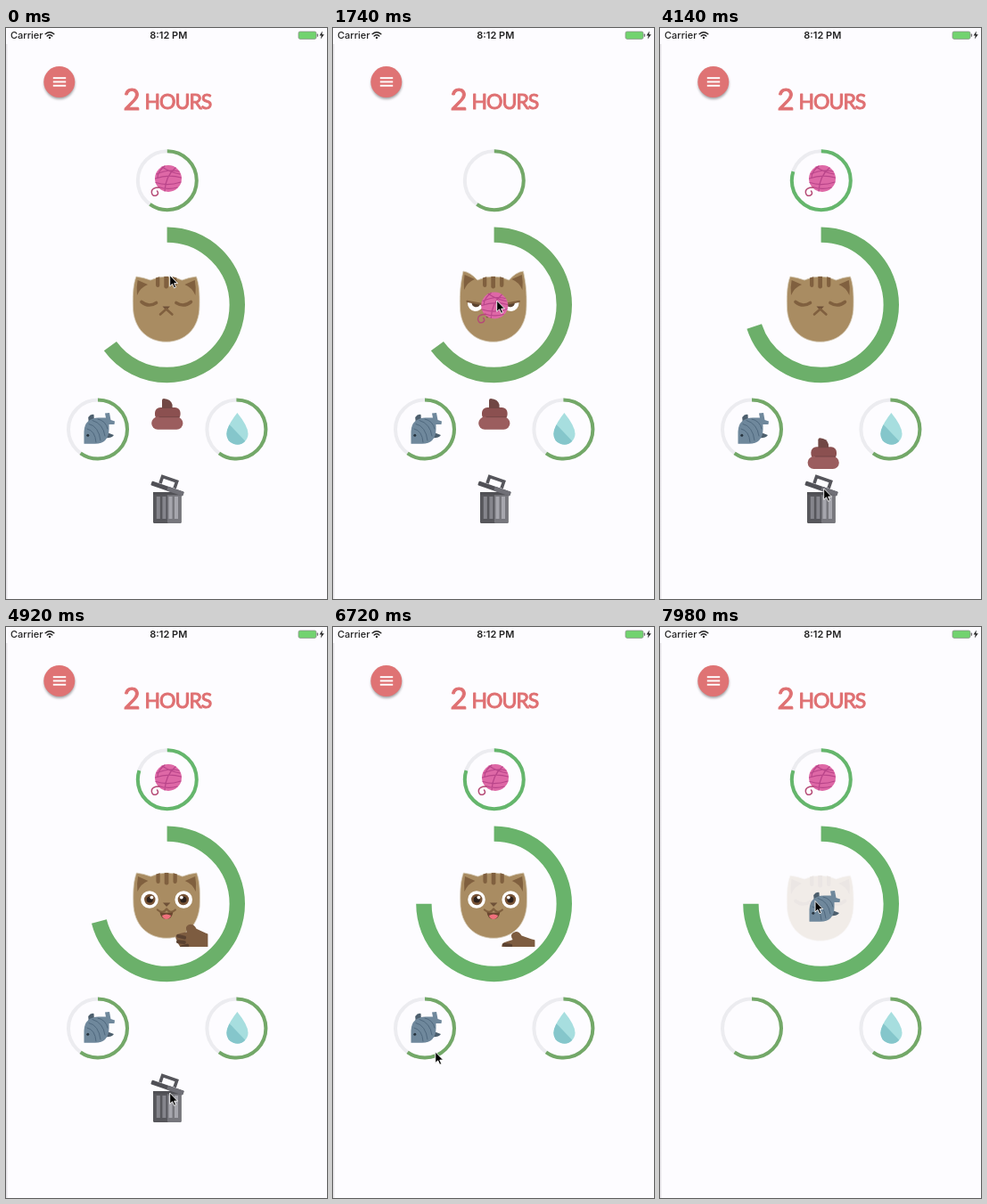
Write an HTML page that moves like this. It is 360 px wide and 641 px high and loops after 8000 ms.

```html
<!DOCTYPE html>
<html lang="en">
<head>
<meta charset="utf-8">
<title>Cat care</title>
<style>
html, body { margin: 0; width: 100%; height: 100%; overflow: hidden; background: #fdfcff; }
svg { display: block; width: 100vw; height: 100vh; }
.bar { font: 500 11px Inter, sans-serif; fill: #222; }
.title { font-family: Lato, sans-serif; fill: #df7072; stroke: #df7072; stroke-width: 1; stroke-linejoin: round; }
.line { fill: none; stroke-linecap: round; stroke-linejoin: round; }
</style>
</head>
<body>
<svg id="stage" viewBox="0 0 360 641" preserveAspectRatio="none"></svg>
<script>
const LOOP = 8000;
const BROWN = '#a98c62', DARK = '#80603f';

const line = (d, color, w) => `<path class="line" d="${d}" stroke="${color}" stroke-width="${w}"/>`;
const shape = (d, color) => `<path d="${d}" fill="${color}"/>`;
const disc = (x, y, r, color) => `<circle cx="${x}" cy="${y}" r="${r}" fill="${color}"/>`;
const box = (x, y, w, h, color, r = 0) =>
  `<rect x="${x}" y="${y}" width="${w}" height="${h}" rx="${r}" fill="${color}"/>`;
const group = (id, body) => `<g id="${id}">${body}</g>`;
const both = part => part + `<g transform="matrix(-1 0 0 1 359.4 0)">${part}</g>`;

function ring(id, x, y, r, w, track) {
  const c = `cx="${x}" cy="${y}" r="${r}" fill="none" stroke-width="${w}"`;
  return (track ? `<circle ${c} stroke="#ececf0"/>` : '') +
    `<circle id="${id}" ${c} pathLength="100" transform="rotate(-90 ${x} ${y})"/>`;
}

function head(ear) {
  const d = `M142.4 312C142 297 143 287 146 ${ear}Q154 ${ear + 1} 162 283Q180 275 197.4 283
    Q205 ${ear + 1} 213.4 ${ear}C216.4 287 217.4 297 217 312C217 338 200 352.3 179.7 352.3S142.4 338 142.4 312Z`;
  return `<path d="${d}" fill="${BROWN}" stroke="#d9cebb" stroke-width=".8"/>` +
    both(shape(`M147.6 ${ear + 4}L159 ${ear + 9}Q151 ${ear + 12} 147 ${ear + 21}Q146 ${ear + 12} 147.6 ${ear + 4}Z`, DARK)) +
    both(shape('M168 280.4L172.3 279.3V289Q172.3 291 170.2 291T168 288Z', DARK)) +
    shape('M177.3 279H182V291Q179.7 294 177.3 291Z', DARK);
}

const nose = shape('M175.5 312.5H184L179.7 317Z', '#6f5138');

const sleepFace = both(line('M152 307.5Q160 314 168.5 308.5', DARK, 3.6)) + nose +
  line('M173 321.5L179.7 315.5L186.4 321.5', DARK, 2.6);

const grumpyFace = both(
  shape('M151 307.5L168.5 310.5A8.8 8.8 0 0 1 151 309Z', '#fff') +
  shape('M155.5 308.3L165 310A4.9 4.9 0 0 1 155.5 308.3Z', '#5b4330') +
  line('M150.5 306.8L169 310.3', DARK, 2.2)) + nose +
  line('M173 324L179.7 317L186.4 324', DARK, 2.6);

const happyFace = both(disc(160.6, 309, 9.8, '#fff') + disc(160.9, 309, 6.2, '#765235') +
  disc(160.9, 309, 3.6, '#2c211c') + disc(163, 306.6, 1.9, '#fff')) + nose +
  shape('M172 322.5Q179.7 325 187 322.5Q186 331 179.5 331T172 322.5Z', '#6a4630') +
  shape('M174.5 327Q179.5 324 184.8 327Q183 331 179.5 331T174.5 327Z', '#f0717c') +
  line('M169.5 320.5Q175.5 325.5 179.7 319.5Q184 325.5 189.5 320.5', DARK, 2.2);

const paw = shape('M194 327Q192 319 200 320L208 321Q207 314 213 314Q218 314 219 321L227 329L246 345V368L226 357L209 346Q194 342 194 327Z', '#7d5c40') +
  line('M197 322L203 326M194.8 328L201 331M197 335L203 335.5', '#5b4231', 4);

const yarn = disc(182, 169, 15, '#de68a6') +
  line('M169 164Q182 158 194 161M167.5 169Q182 164 196.5 168M168 173.5Q181 178 196 173M171 178.5Q182 182 192 179M175 156Q184 162 195 164M178 155Q170 161 170 168M190 157Q179 166 178 183', '#b9458a', 1.2) +
  line('M172 179Q163 179 163.3 184.5Q164 189.5 168.5 188Q172 186 169.5 183', '#b54a76', 1.5);

const fish = shape('M93 446L92.2 437Q95 433 98.5 434L99 442ZM108 452L121 457Q118 461 110 460Z', '#4d5f6e') +
  shape('M87.5 466.7V453Q88 438 104 437.5H112L111 432.5L116 432L117.5 440L122 441.5L121.5 445H115.5V451Q115 466.5 100 466.7Z', '#6f889c') +
  line('M93 444.5Q104 447 106 463M97 440.5Q109 444 111 458M103 439Q112 441 114 450M91 450Q100 452 101 465', '#4f687e', 1) +
  disc(91.8, 457.3, 1.5, '#27343f');

const drop = shape('M259.4 432Q271.5 447 271.5 455.5A12 12 0 0 1 247.4 455.5Q247.4 447 259.4 432Z', '#a7dedf') +
  shape('M250.6 445.2L268.3 463.7A12 12 0 0 1 247.4 455.5Q247.5 451 250.6 445.2Z', '#85c6cb');

const poop = box(167, 426, 28.6, 14, '#8b5050', 6) + box(163.2, 436.6, 35.2, 14.2, '#9b5d5e', 7) +
  shape('M175 427V418Q175 416 177 416Q185 416.5 186.6 423V427Z', '#714744') +
  line('M172 436.7H194', '#734545', 1);

const trash = box(165, 521, 31.6, 35, '#57575c', 1.5) + box(181, 521, 15.6, 35, '#77777d', 1.5) +
  [168.8, 175.4].map(x => box(x, 526, 4, 25, '#85858c')).join('') +
  [182.5, 189].map(x => box(x, 526, 4, 25, '#a6a6ad')).join('') +
  box(165, 521, 31.6, 3.2, '#505055') +
  `<g transform="rotate(19 181 517)">${box(162, 514.5, 38, 5, '#505056', 1)}${box(181, 514.5, 19, 5, '#707077', 1)}
  <path d="M171.5 514V506H188.5V514" fill="none" stroke="#55555b" stroke-width="3.6"/></g>`;

const status = `<text class="bar" x="5" y="12" font-weight="400">Carrier</text>` +
  line('M44.2 6.8Q49 2.6 53.8 6.8M46.2 9Q49 6.6 51.8 9', '#222', 1.5) + disc(49, 10.9, 1.2, '#222') +
  `<text class="bar" x="182.3" y="12" text-anchor="middle" style="font-weight:600">8:12 PM</text>` +
  `<rect x="328" y="4" width="20" height="8.4" rx="1.8" fill="#72d36f" stroke="#8a8a8a" stroke-width=".7"/>` +
  box(348.7, 6.6, 1.4, 3.2, '#777', .6) + shape('M354.8 3.5L351.6 8.6H353.8L352.8 12.6L356.8 7.2H354.4Z', '#222');

const $ = id => document.getElementById(id);
$('stage').innerHTML = `
<defs>
  <linearGradient id="edge"><stop stop-color="#dfdde1"/><stop offset="1" stop-color="#fdfcff"/></linearGradient>
  <filter id="soft" x="-50%" y="-50%" width="200%" height="200%"><feGaussianBlur stdDeviation="1.5"/></filter>
  <clipPath id="frame"><rect x="140" y="260" width="86.4" height="99"/></clipPath>
</defs>
<rect width="360" height="641" fill="#fdfcff"/>
<rect y="18" width="2.5" height="623" fill="url(#edge)"/>
${status}
<circle cx="60" cy="62.5" r="17.2" fill="#000" opacity=".38" filter="url(#soft)"/>
${disc(59.8, 60.5, 17.5, '#df7374')}
${[55.2, 59.5, 63.8].map(y => box(52.8, y, 14.4, 1.9, '#fff')).join('')}
<text class="title" x="131.5" y="91.5" font-size="33">2</text>
<text class="title" x="155.5" y="90.8" font-size="23" letter-spacing="-1">HOURS</text>
${ring('top', 180.8, 171.2, 33, 4, true)}
${ring('left', 103, 450.6, 33, 4, true)}
${ring('right', 258.4, 450.6, 33, 4, true)}
${ring('mood', 180.6, 310.8, 78.7, 17.4)}
${group('sleep', head(279) + sleepFace)}
${group('grumpy', head(273) + grumpyFace)}
${group('happy', `<g transform="translate(.4 -3)">${head(279) + happyFace}</g>
  <g clip-path="url(#frame)">${group('paw', paw)}</g>`)}
${group('trash', trash)}${group('poop', poop)}${group('yarn', yarn)}${group('fish', fish)}${drop}
<g id="cursor"><path d="M0 0V12.4L2.9 9.8L4.9 14.3L6.9 13.4L5 9.1H8.8Z" fill="#000" stroke="#fff" stroke-width=".9"/></g>`;

// Eased value of [time, value] stops.
function key(t, stops) {
  let [t0, v0] = stops[0];
  for (const [t1, v1] of stops) {
    if (t < t1) {
      const p = Math.max(0, (t - t0) / (t1 - t0 || 1));
      return v0 + (v1 - v0) * p * p * (3 - 2 * p);
    }
    [t0, v0] = [t1, v1];
  }
  return v0;
}

const ramp = (t, start, length) => Math.min(1, Math.max(0, (t - start) / length));
const move = (id, x, y, more = '') => $(id).setAttribute('transform', `translate(${x} ${y})${more}`);
const fade = (id, v) => $(id).setAttribute('opacity', v);

function fill(id, value) {
  const p = (value - 60) / 20;
  const mix = (a, b) => Math.round(a + (b - a) * p);
  const el = $(id);
  el.setAttribute('stroke', `rgb(${mix(115, 101)},${mix(168, 182)},${mix(104, 108)})`);
  el.setAttribute('stroke-dasharray', `${value} 100`);
}

const moods = [[-1000, 'sleep'], [1150, 'grumpy'], [2100, 'sleep'], [4600, 'happy'], [7948, 'sleep']];

function draw(t) {
  const [since, mood] = moods.filter(m => m[0] <= t).pop();
  for (const id of ['sleep', 'grumpy', 'happy']) fade(id, id === mood ? ramp(t, since, 240) : 0);

  move('cursor',
    key(t, [[0, 183.7], [5700, 183.7], [6720, 114.8], [7050, 95], [7250, 95], [7900, 174]]),
    key(t, [[0, 277.5], [550, 164], [750, 164], [1500, 306], [2300, 306], [2880, 401], [3200, 433],
      [3500, 433], [4140, 517], [4350, 523], [5700, 523], [6720, 477], [7050, 442.5], [7250, 442.5], [7900, 307.5]]));

  move('yarn', key(t, [[750, 0], [1500, -.8], [2100, -.8], [2450, 0]]),
    key(t, [[750, 0], [1500, 142.5], [2100, 142.5], [2450, 0]]));
  move('fish', key(t, [[7250, 0], [7920, 80]]), key(t, [[7250, 0], [7920, -136]]));
  move('poop', key(t, [[2300, 0], [2800, 2.4]]), key(t, [[3500, 0], [4140, 44.3], [4400, 86]]));
  fade('poop', 1 - ramp(t, 4450, 150));
  fade('trash', 1 - ramp(t, 4950, 240));

  const down = key(t, [[4600, 1.4], [5250, 0], [6250, 0], [6720, 1], [6950, 1.4], [7500, 0]]);
  const wave = 6 * Math.max(0, 1 - down) * Math.sin((t - 5580) / 500 * 2 * Math.PI);
  move('paw', -2 * down, 30 * down, ` rotate(${wave - 25 * down} 206 331)`);

  fill('top', key(t, [[2200, 60], [3200, 80]]));
  fill('left', 60);
  fill('right', 60);
  fill('mood', key(t, [[2250, 65], [3400, 70], [4600, 70], [5750, 75]]));
}

function tick(now) {
  draw(now % LOOP);
  requestAnimationFrame(tick);
}
draw(0);
requestAnimationFrame(tick);
</script>
</body>
</html>
```
